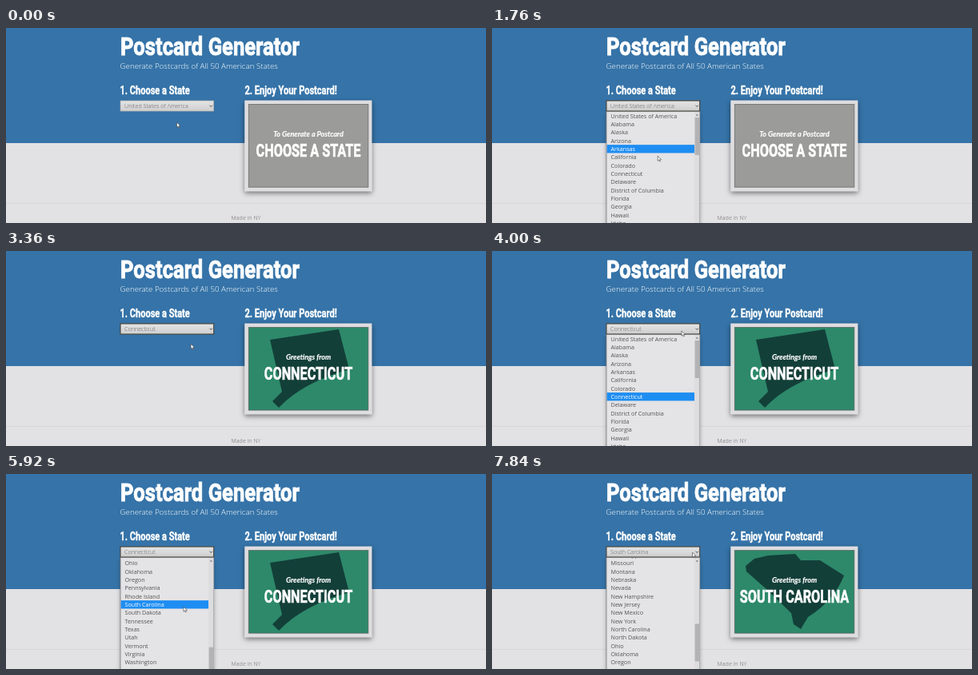
Write an HTML page that moves like this. It is 600 px wide and 244 px high and loops after 8000 ms.

```html
<!DOCTYPE html>
<html lang="en">
<head>
<meta charset="utf-8">
<title>Postcard Generator</title>
<style>
  html, body { margin: 0; width: 100%; height: 100%; overflow: hidden; background: #e2e1e4; }
  svg { display: block; width: 100%; height: 100%; }
  text { font-family: "Open Sans", sans-serif; font-size: 7.2px; }
  .light { font-weight: 300; }
  .display { font-family: Roboto, sans-serif; font-weight: 700; fill: #fff; stroke: #fff; stroke-width: .03em; }
  .title { font-size: 32px; }
  .heading { font-size: 13.8px; }
  .caps { font-size: 22.7px; text-anchor: middle; }
  .script { font: italic 700 9px Lato, sans-serif; fill: #fff; stroke: #fff; stroke-width: .2; text-anchor: middle; }
  .row { fill: #555; }
  .row.active { fill: #fff; }
</style>
</head>
<body>
<svg viewBox="0 0 600 244">
  <defs>
    <linearGradient id="button" x2="0" y2="1">
      <stop offset="0" stop-color="#e4e4e4"/><stop offset="1" stop-color="#cfcfcf"/>
    </linearGradient>
    <filter id="shadow" x="-20%" y="-20%" width="140%" height="150%">
      <feDropShadow dx="0" dy="2.5" stdDeviation="3" flood-opacity=".5"/>
    </filter>
    <filter id="softShadow" x="-20%" y="-20%" width="140%" height="150%">
      <feDropShadow dx="0" dy="2" stdDeviation="2.5" flood-opacity=".3"/>
    </filter>
    <clipPath id="listClip"><rect x="143" y="104.8" width="117" height="167"/></clipPath>
  </defs>

  <rect width="600" height="144" fill="#3573a8"/>
  <rect y="144" width="600" height="100" fill="#e2e1e4"/>
  <rect y="219" width="600" height="1" fill="#d6d5d8"/>

  <text class="display title" transform="translate(143 34) scale(.8 1)">Postcard Generator</text>
  <text class="display heading" transform="translate(142.5 83) scale(.8 1)">1. Choose a State</text>
  <text class="display heading" transform="translate(298.5 83) scale(.8 1)">2. Enjoy Your Postcard!</text>
  <text class="light" x="142.5" y="50.7" fill="#fff" style="font-size:9.75px">Generate Postcards of All 50 American States</text>
  <text class="light" x="300" y="240" fill="#666" text-anchor="middle">Made in NY</text>

  <rect x="298.3" y="90.6" width="159" height="113.5" fill="#dedddf" filter="url(#shadow)"/>
  <rect id="cardFace" x="303.3" y="95.5" width="149.5" height="103.7" stroke="#555" stroke-opacity=".7" stroke-width=".9"/>
  <path id="outline" fill="#133f39"/>
  <text id="cardLead" class="script" x="378" y="136.3"></text>
  <text id="cardName" class="display caps" transform="translate(378 161) scale(.715 1)"></text>

  <rect id="select" x="143" y="91" width="116.7" height="13" fill="url(#button)"/>
  <text id="value" class="light" x="148" y="100.2" fill="#606060"></text>
  <path d="M254.6 96.7l1.7 1.8 1.7-1.8" fill="none" stroke="#444" stroke-width=".9"/>

  <g id="menu">
    <rect x="143" y="104.5" width="116.7" height="167.5" fill="#e4e3e5" stroke="#777" stroke-width=".8" filter="url(#softShadow)"/>
    <g clip-path="url(#listClip)"><g id="rows">
      <rect id="bar" x="143.6" width="109.6" height="10.33" fill="#1e8df2"/>
    </g></g>
    <rect x="253.2" y="105" width="6.2" height="167" fill="#dddcde"/>
    <path d="M254.8 109.6l1.5-1.8 1.5 1.8z" fill="#666"/>
    <rect id="thumb" x="253.6" width="5.4" height="47" fill="#b3b2b4"/>
  </g>

  <path id="cursor" d="M0 0V6.2L1.5 4.9 2.5 7 3.4 6.6 2.5 4.6H4.4Z" fill="#fff" stroke="#333" stroke-width=".55"/>
</svg>
<script>
const LOOP = 8000, STEP = 160;
const ROW = 10.33, TOP = 104.8, VIEW = 167;
const $ = id => document.getElementById(id);

const places = ("United States of America,Alabama,Alaska,Arizona,Arkansas,California,Colorado,Connecticut,Delaware," +
  "District of Columbia,Florida,Georgia,Hawaii,Idaho,Illinois,Indiana,Iowa,Kansas,Kentucky,Louisiana,Maine," +
  "Maryland,Massachusetts,Michigan,Minnesota,Mississippi,Missouri,Montana,Nebraska,Nevada,New Hampshire," +
  "New Jersey,New Mexico,New York,North Carolina,North Dakota,Ohio,Oklahoma,Oregon,Pennsylvania,Rhode Island," +
  "South Carolina,South Dakota,Tennessee,Texas,Utah,Vermont,Virginia,Washington,West Virginia,Wisconsin,Wyoming").split(",");
const LENGTH = places.length * ROW;

const outlines = {
  "Connecticut": "M330 111L416 98 429 148Q370 165 341 196L333 188 345 176Z",
  "South Carolina": "M317 115L328 106 345 102 379 100 386 108 410 108 440 127Q428 158 395 179L386 194 377 188 374 174 343 144 318 122Z"
};

// Each visit opens the menu and closes it on a pick.
const visits = [
  { open: 960, close: 2720, pick: "Connecticut" },
  { open: 3840, close: 6080, pick: "South Carolina" },
  { open: 7360, close: LOOP }
];
const glides = [
  { start: 160, end: 960, x: 210, y: 100 },
  { start: 1440, end: 2080, x: 206, y: 185 },
  { start: 2880, end: 3680, x: 237, y: 100 },
  { start: 4000, end: 4480, x: 222, y: 166 },
  { start: 6240, end: 7200, x: 250.5, y: 98 }
];
const wheel = { start: 4320, end: 4800 };

const progress = (t, { start, end }) => Math.min(1, Math.max(0, (t - start) / (end - start)));
const easeOut = p => Math.sin(p * Math.PI / 2);

const cursorAt = t => glides.reduce((at, glide) => {
  const p = easeOut(progress(t, glide));
  return { x: at.x + (glide.x - at.x) * p, y: at.y + (glide.y - at.y) * p };
}, { x: 213.5, y: 118 });

function choiceAt(t) {
  const picked = visits.filter(v => v.close + STEP <= t).pop();
  return picked ? places.indexOf(picked.pick) : 0;
}

// The menu opens with the chosen row in view; the wheel then runs to the end of the list.
function scrollAt(t, choice) {
  const first = Math.max(0, (choice + 1) * ROW - VIEW);
  const wheeled = t < wheel.end + LOOP / 4 ? progress(t, wheel) : 0;
  return first + (LENGTH - VIEW - first) * wheeled;
}

function activeRow(t, choice, scroll) {
  if (t > wheel.start && t <= wheel.end) return -1;
  const { y } = cursorAt(t - STEP / 2); // the highlight lags behind the pointer
  return y < TOP ? choice : Math.floor((y - TOP + scroll) / ROW);
}

const rows = places.map((name, i) => {
  const row = document.createElementNS("http://www.w3.org/2000/svg", "text");
  row.textContent = name;
  row.setAttribute("x", 148.5);
  row.setAttribute("y", TOP + i * ROW + 7.8);
  $("rows").append(row);
  return row;
});

function render(t) {
  const choice = choiceAt(t), name = places[choice];
  const open = visits.some(v => t >= v.open && t < v.close);
  const scroll = scrollAt(t, choice), active = activeRow(t, choice, scroll);
  const focused = open || choice > 0;

  $("value").textContent = name;
  $("select").setAttribute("stroke", focused ? "#4d4236" : "#aaa");
  $("select").setAttribute("stroke-width", focused ? 1.1 : .7);
  $("cardFace").setAttribute("fill", choice ? "#2d896a" : "#9b9b99");
  $("outline").setAttribute("d", outlines[name] || "");
  $("cardLead").textContent = choice ? "Greetings from" : "To Generate a Postcard";
  $("cardName").textContent = choice ? name.toUpperCase() : "CHOOSE A STATE";

  $("menu").style.display = open ? "" : "none";
  $("rows").setAttribute("transform", `translate(0 ${-scroll})`);
  $("bar").setAttribute("y", TOP + active * ROW);
  rows.forEach((row, i) => row.setAttribute("class", i === active ? "row active" : "row"));
  $("thumb").setAttribute("y", 112 + scroll / LENGTH * 152);

  const { x, y } = cursorAt(t);
  $("cursor").setAttribute("transform", `translate(${x} ${y})`);
}

const start = performance.now();
function tick() {
  const t = (performance.now() - start) % LOOP;
  render(Math.floor(t / STEP) * STEP);
  requestAnimationFrame(tick);
}
tick();
</script>
</body>
</html>
```
